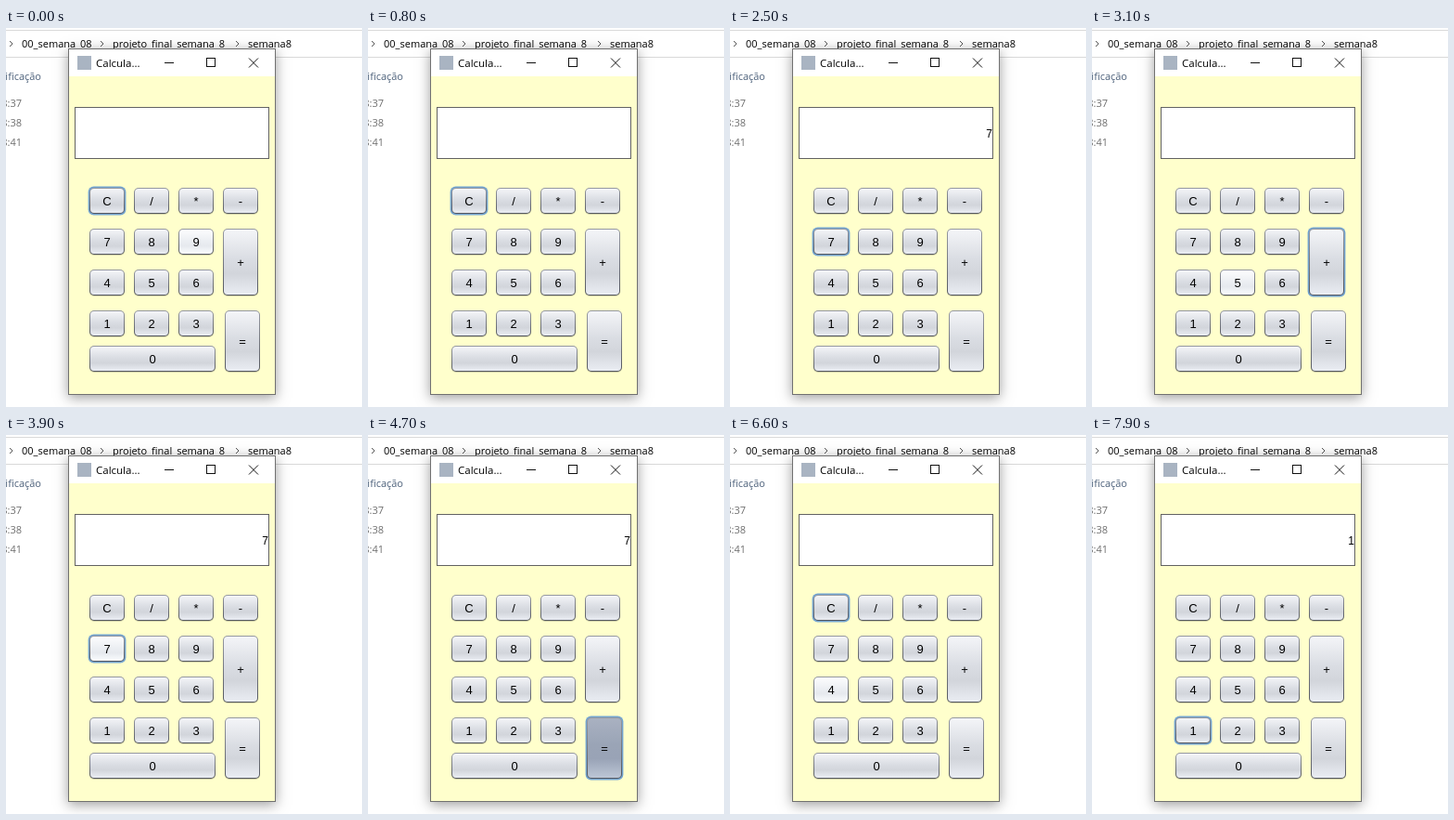
Write an HTML page with a canvas that moves like this. It is 384 px wide and 408 px high and loops after 8 s.

```html
<!DOCTYPE html>
<html lang="pt">
<head>
<meta charset="utf-8">
<title>Calculadora</title>
<style>
html, body { margin: 0; width: 100%; height: 100%; overflow: hidden; background: #fff; }
canvas { display: block; }
</style>
</head>
<body>
<canvas id="stage" width="384" height="408"></canvas>
<script>
const ctx = document.getElementById('stage').getContext('2d');
const LOOP = 8000;
const UI = '"Open Sans", "Noto Sans", sans-serif';
const SWING = '"Liberation Sans", Arial, sans-serif';

const buttons = ['C/*-', '789', '456', '123'].flatMap((row, r) =>
  [...row].map((key, c) => ({ key, x: 90 + c * 48, y: 172 + r * 44, w: 38, h: 28 })));
buttons.push(
  { key: '+', x: 234, y: 216, w: 38, h: 72 },
  { key: '=', x: 236, y: 304, w: 38, h: 66 },
  { key: '0', x: 90, y: 342, w: 136, h: 28 });

// Each track lists "time:value" steps, times in tenths of a second.
const track = s => s.split(' ').map(p => {
  const i = p.indexOf(':');
  return [p.slice(0, i) * 100, p.slice(i + 1)];
});
const hover = track('0:9 1:+ 2:- 5: 7:* 8: 9:/ 10:C 13: 14:7 15:4 16: 17:7 23:8 24:6 25: ' +
  '27:+ 30:6 31:5 33:4 34:7 40: 41:6 42:= 53:6 54:5 55:8 57: 59:C 64: 65:7 66:4 ' +
  '70: 71:1 77: 78:0 79:');
const press = track('0: 11:C 12: 20:7 22: 28:+ 29: 37:7 39: 47:= 49: 62:C 63: 75:1 76:');
const focus = track('0:C 20:7 28:+ 37:7 47:= 62:C 75:1');
const display = track('0: 22:7 29: 39:7 49:14 63: 76:1');

function at(steps, t) {
  let value = '';
  for (const [start, v] of steps) if (start <= t) value = v;
  return value;
}

function text(s, x, y, font, color = '#000', align = 'left') {
  ctx.font = font;
  ctx.fillStyle = color;
  ctx.textAlign = align;
  ctx.fillText(s, x, y);
}

function line(color, ...pts) {
  ctx.strokeStyle = color;
  ctx.lineWidth = 1;
  ctx.beginPath();
  for (let i = 0; i < pts.length; i += 4) {
    ctx.moveTo(pts[i], pts[i + 1]);
    ctx.lineTo(pts[i + 2], pts[i + 3]);
  }
  ctx.stroke();
}

function box(x, y, w, h, fill, stroke) {
  ctx.fillStyle = fill;
  ctx.fillRect(x, y, w, h);
  if (!stroke) return;
  ctx.strokeStyle = stroke;
  ctx.lineWidth = 1;
  ctx.strokeRect(x + 0.5, y + 0.5, w - 1, h - 1);
}

function round(x, y, w, h, r, fill) {
  ctx.fillStyle = fill;
  ctx.beginPath();
  ctx.roundRect(x, y, w, h, r);
  ctx.fill();
}

function shade(y, h, colors) {
  const g = ctx.createLinearGradient(0, y, 0, y + h);
  const stops = [0, 0.45, 0.68, 1];
  colors.forEach((c, i) => g.addColorStop(colors.length === 2 ? i : stops[i], c));
  return g;
}

const skins = {
  normal: ['#f4f5f8', '#dadde3', '#d2d5db', '#eaedf3'],
  over: ['#fdfdfe', '#eceff3', '#e6e9ee', '#fbfdff'],
  down: ['#a9b1c1', '#9aa4b6', '#99a3b6', '#bcc6d6']
};

function drawButton({ key, x, y, w, h }, state) {
  if (state.focus === key) round(x - 1.4, y - 1.4, w + 2.8, h + 2.8, 6, '#73a4d1');
  else round(x, y + 1, w, h, 5, 'rgba(90,90,70,.25)');
  const skin = state.press === key ? 'down' : state.hover === key ? 'over' : 'normal';
  round(x, y, w, h, 5, shade(y, h, ['#9699a1', '#54575e']));
  round(x + 1, y + 1, w - 2, h - 2, 4, shade(y + 1, h - 2, skins[skin]));
  text(key, x + w / 2, y + h / 2 + 5, '13px ' + SWING, '#000', 'center');
}

function drawExplorer() {
  box(0, 0, 384, 408, '#fff');
  line('#d9d9d9', 0, 2.5, 384, 2.5, 0, 31.5, 384, 31.5);
  const font = '11px ' + UI;
  text('00_semana_08', 17, 21, font);
  text('projeto_final_semana_8', 115, 21, font);
  text('semana8', 261, 21, font);
  for (const x of [4, 102, 248]) line('#555', x, 14, x + 3, 17, x + 3, 17, x, 20);
  text('ificação', 38, 56, font, '#4c607a', 'right');
  ['8:37', '8:38', '8:41'].forEach((s, i) =>
    text(s, 17, 85 + i * 21, font, '#6d6d6d', 'right'));
}

function drawWindow() {
  ctx.save();
  ctx.shadowColor = 'rgba(0,0,0,.38)';
  ctx.shadowBlur = 13;
  ctx.shadowOffsetY = 3;
  box(67, 22, 224, 373, '#fff');
  ctx.restore();
  box(67, 22, 224, 373, '#fff', '#707070');
  box(68, 52, 222, 342, '#ffffcc');
  box(77, 30, 15, 15, '#a9b4c2');
  text('Calcula...', 97, 42, '11.5px ' + UI);
  line('#111', 171, 37.5, 181, 37.5, 262, 32.5, 272, 42.5, 272, 32.5, 262, 42.5);
  box(216, 32, 10, 10, '#fff', '#111');
}

function draw(t) {
  const state = { hover: at(hover, t), press: at(press, t), focus: at(focus, t) };
  drawExplorer();
  drawWindow();
  box(74, 85, 210, 56, '#fff', '#626262');
  text(at(display, t), 283, 118, '12px ' + SWING, '#000', 'right');
  buttons.forEach(b => drawButton(b, state));
}

const begin = performance.now();
function tick() {
  draw((performance.now() - begin) % LOOP);
  requestAnimationFrame(tick);
}
tick();
</script>
</body>
</html>
```
